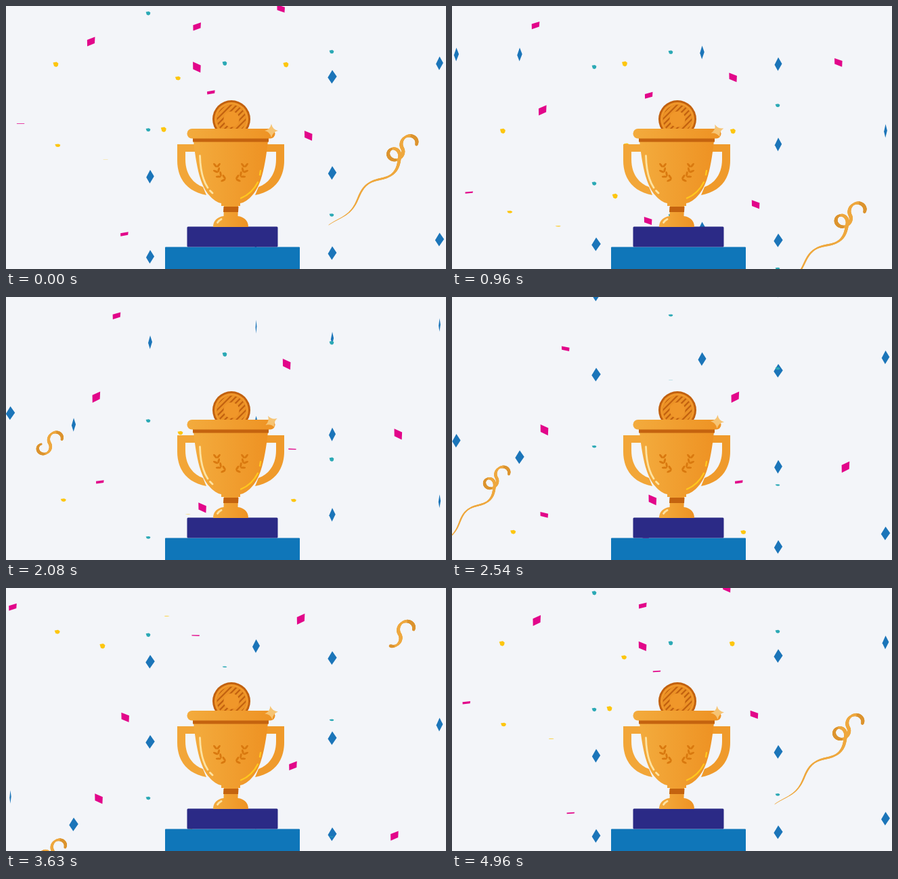
These frames come from a looping animation (650 px wide and 388 px high, 5 s). An HTML page with a canvas:

```html
<!DOCTYPE html>
<html lang="en">
<head>
<meta charset="utf-8">
<title>Trophy with confetti</title>
<style>
  html, body { margin: 0; width: 100%; height: 100%; overflow: hidden; background: #f3f5f9; }
  canvas, svg { position: absolute; left: 0; top: 0; width: 650px; height: 388px; }
</style>
</head>
<body>
<canvas id="sky"></canvas>
<svg viewBox="0 0 650 388">
  <defs>
    <linearGradient id="gold"><stop offset="0" stop-color="#f3ab3d"/><stop offset="1" stop-color="#ee9223"/></linearGradient>
    <clipPath id="face"><circle cx="333" cy="167" r="21.5"/></clipPath>
    <path id="handle" d="M253 204H280V215H265V226C265 247 275 261 291 267L296 279C268 274 253 255 253 228Z"/>
    <g id="laurel" fill="#d9790f"></g>
  </defs>

  <rect x="235" y="355.5" width="199" height="40" rx="1" fill="#0f76b9"/>
  <rect x="267.5" y="325.5" width="134" height="30" rx="1.5" fill="#2b2a86"/>

  <circle cx="333" cy="167" r="28" fill="#c2610f"/>
  <circle cx="333" cy="167" r="25" fill="#f0972a"/>
  <circle cx="333" cy="167" r="21.5" fill="#c2610f"/>
  <g id="stripes" clip-path="url(#face)" stroke="#ec9226" stroke-width="3.8"></g>
  <circle cx="333" cy="167" r="11.5" fill="#f0972a"/>

  <use href="#handle" fill="#f2a638"/>
  <use href="#handle" fill="#ef9a2b" transform="matrix(-1 0 0 1 664 0)"/>
  <path fill="url(#gold)" d="M277 199H387C383 236 377 265 364 279C358 286 352 290 346 291V295H318V291C312 290 306 286 300 279C287 265 281 236 277 199Z"/>
  <rect x="276" y="194" width="112" height="6.5" fill="#c4630f"/>
  <rect x="267.5" y="181" width="130" height="14.5" rx="7.2" fill="url(#gold)"/>
  <path fill="url(#gold)" d="M322 295H343L342.5 310C352 311 358 317 358 326H306C306 317 312 311 321.5 310Z"/>
  <path fill="#c4630f" d="M321.5 296H343.5L343 304H321Z"/>

  <use href="#laurel"/>
  <use href="#laurel" transform="matrix(-1 0 0 1 664 0)"/>
  <g fill="none" stroke-linecap="round" stroke-width="2.8">
    <path stroke="#fde3a2" d="M286.5 221C287 242 290 256 298 268M301.5 272.5L305 276M312.5 319.5C314 317 316 315.5 318 314.5"/>
    <path stroke="#ffc81e" stroke-width="2.3" d="M376 243L375 249M372 260C367 270 358 279 347 283.5"/>
  </g>
  <path id="star" fill="#f6c474" d="M0-10Q1.8-1.8 10 0Q1.8 1.8 0 10Q-1.8 1.8-10 0Q-1.8-1.8 0-10Z"/>
</svg>
<script>
const W = 650, H = 388, FRAMES = 120, LOOP = 5000;
const { PI, sin, cos, abs, max, min } = Math;
const $ = id => document.getElementById(id);
const rad = deg => deg * PI / 180;
const range = n => [...Array(n).keys()];

const ctx = $('sky').getContext('2d');
const dpr = window.devicePixelRatio || 1;
ctx.canvas.width = W * dpr;
ctx.canvas.height = H * dpr;

$('stripes').innerHTML = range(11).map(i => `<path d="M${266 + i * 8.6} 191l48-48"/>`).join('');

// Laurel: pairs of leaves along a quarter circle
$('laurel').innerHTML = range(4).map(i => {
  const a = 105 + i * 25, x = 329 + 17.5 * cos(rad(a)), y = 238 + 18 * sin(rad(a));
  return [-40, 40].map(turn =>
    `<ellipse cx="4" rx="3.8" ry="1.5" transform="translate(${x} ${y}) rotate(${a + 90 + turn})"/>`).join('');
}).join('');

// Repeats each [x, start, count] piece a fixed number of frames apart
const repeat = (gap, rows) => rows.flatMap(([x, start, count = 1]) =>
  range(count).map(i => ({ x, start: start + i * gap })));

// Blue kites come in four waves, every other one a little late
const kites = [[482, 3, '0123'], [369.5, 7, '012'], [213, 1.7, '12'], [640.5, 7.6, '13'], [100, 6.3, '0']]
  .flatMap(([x, phase, waves]) => [...waves].map(n => ({ x, start: phase + n * 30 + n % 2 * 2.7 })));
const teal = repeat(70, [[210, -3.3, 2], [323, 25.2, 2], [481, 30.2, 2], [323, 53, 2]]);
const yellow = repeat(28, [[0, 71.7, 2], [181.5, 94.9, 2], [340, 99.6], [69, 66.8], [158, 77.2]]);
const magenta = repeat(28.4, [[0, 108, 2], [153, 71, 2], [285, 119, 2], [40, 43.6], [158.5, 113],
  [171, 91], [310.5, 76.5], [442.5, 4], [-113.5, 80.5]]);

const ageOf = (k, start) => {
  const a = (k - start + 2 * FRAMES) % FRAMES;
  return a > 117 ? a - FRAMES : a;
};
const spin = (age, zero, half) => sin(PI * (age - zero) / half);

function poly(x, y, pts, sx, sy) {
  ctx.beginPath();
  for (const [px, py] of pts) ctx.lineTo(x + px * sx, y + py * sy);
  ctx.fill();
}

const kite = [[0, -10], [.5, -.5], [-.05, 10], [-.5, 1]];
const scrap = [[-.5, -.35], [.15, -.5], [.5, -.2], [.4, .3], [.1, .5], [-.3, .35]];

function drawKite(x, y, turn) {
  poly(x, y, kite, max(.6, 13.5 * abs(turn)), 1);
}

function drawScraps(list, k, color, speed, size, zero, half, sway) {
  ctx.fillStyle = color;
  for (const { x, start } of list) {
    const a = ageOf(k, start), y = a * speed - .5;
    poly(x + sway(y), y, scrap, size, max(.4, size * .95 * abs(spin(a, zero, half))));
  }
}

const yellowSway = y => 72.3 + (y < 115 ? .00135 * (115 - y) ** 2 : 12.5 * ((y - 115) / 185) ** 1.6);
const magentaSway = y => 139 - (y < 255 ? 18 * ((255 - y) / 253) ** 1.35 : 10 * ((y - 255) / 127) ** 2);

function drawMagenta(k) {
  ctx.fillStyle = '#e2068a';
  for (const { x, start } of magenta) {
    const a = ageOf(k, start), y = a * 4.41 - .5, v = spin(a, 3.9, 11.85);
    const h = 5.3 * abs(v) + .3, s = 2.7 * v;
    poly(x + magentaSway(y), y, [[-5.8, s - h], [5.8, -s - h], [5.3, h - s], [-5.6, h + s]], 1, 1);
  }
}

// Streamer: a curl one way, a loop the other way, then a fading wave
const CURL = 43, LOOP_END = 111, LENGTH = 250;
function heading(s) {
  if (s < CURL) return -65 - 5.6 * s;
  if (s < LOOP_END) return -306 + 5.85 * (s - CURL);
  return 137 + (42 - .2 * (s - 115)) * cos((s - 156) / 82 * 2 * PI);
}
const streamer = [[0, 0]];
for (let s = 0, x = 0, y = 0; s < LENGTH; s++) {
  const a = rad(heading(s + .5));
  streamer.push([x += cos(a) - .08, y += sin(a) + .09]);
}

function drawStreamer(x, y, speed, scale, age) {
  const grown = .03 + .97 * min(1, age / 32) ** 2;
  ctx.save();
  ctx.translate(x + age * .13, y + age * speed);
  ctx.rotate((age - 49) * .0016);
  ctx.scale(scale, scale);
  ctx.lineCap = 'round';
  for (let i = 0; i < LENGTH * grown; i++) {
    const [x0, y0] = streamer[i], [x1, y1] = streamer[i + 1], u = i / LENGTH;
    const taper = min(1, 1 - .8 * (u - .45) / .55);
    ctx.lineWidth = taper * (3 + 2.2 * abs(sin(rad(heading(i)) + .5)));
    ctx.strokeStyle = y1 < y0 ? '#dc942f' : '#eea83f';
    ctx.beginPath();
    ctx.moveTo(x0, y0);
    ctx.lineTo(x1, y1);
    ctx.stroke();
  }
  ctx.restore();
}

function draw(k) {
  ctx.setTransform(dpr, 0, 0, dpr, 0, 0);
  ctx.clearRect(0, 0, W, H);

  ctx.fillStyle = '#1b75b9';
  for (const { x, start } of kites) {
    const a = ageOf(k, start);
    drawKite(x, a * 4.333 - .8, spin(a, 11.5, 28));
  }
  const slow = ageOf(k, 3.7);
  drawKite(6.5, slow * 3.7, spin(slow, 4, 84));

  drawScraps(teal, k, '#2ba9b5', 3.44, 6.8, 12, 24, () => 0);
  drawScraps(yellow, k, '#fdc60f', 4.27, 8, 9, 22, yellowSway);
  drawMagenta(k);

  drawStreamer(600, -8, 4.33, 1, (k + FRAMES - 71) % FRAMES);
  drawStreamer(80, 121.6, 4.66, .87, (k + FRAMES - 31) % FRAMES);

  $('star').setAttribute('transform', `translate(392 184) rotate(${k * 3 % 90})`);
}

const t0 = performance.now();
function tick() {
  const t = Math.floor((performance.now() - t0) % LOOP / 10) * 10;
  draw(Math.ceil((t + 5) * FRAMES / LOOP) - 1);
  requestAnimationFrame(tick);
}
tick();
</script>
</body>
</html>
```
